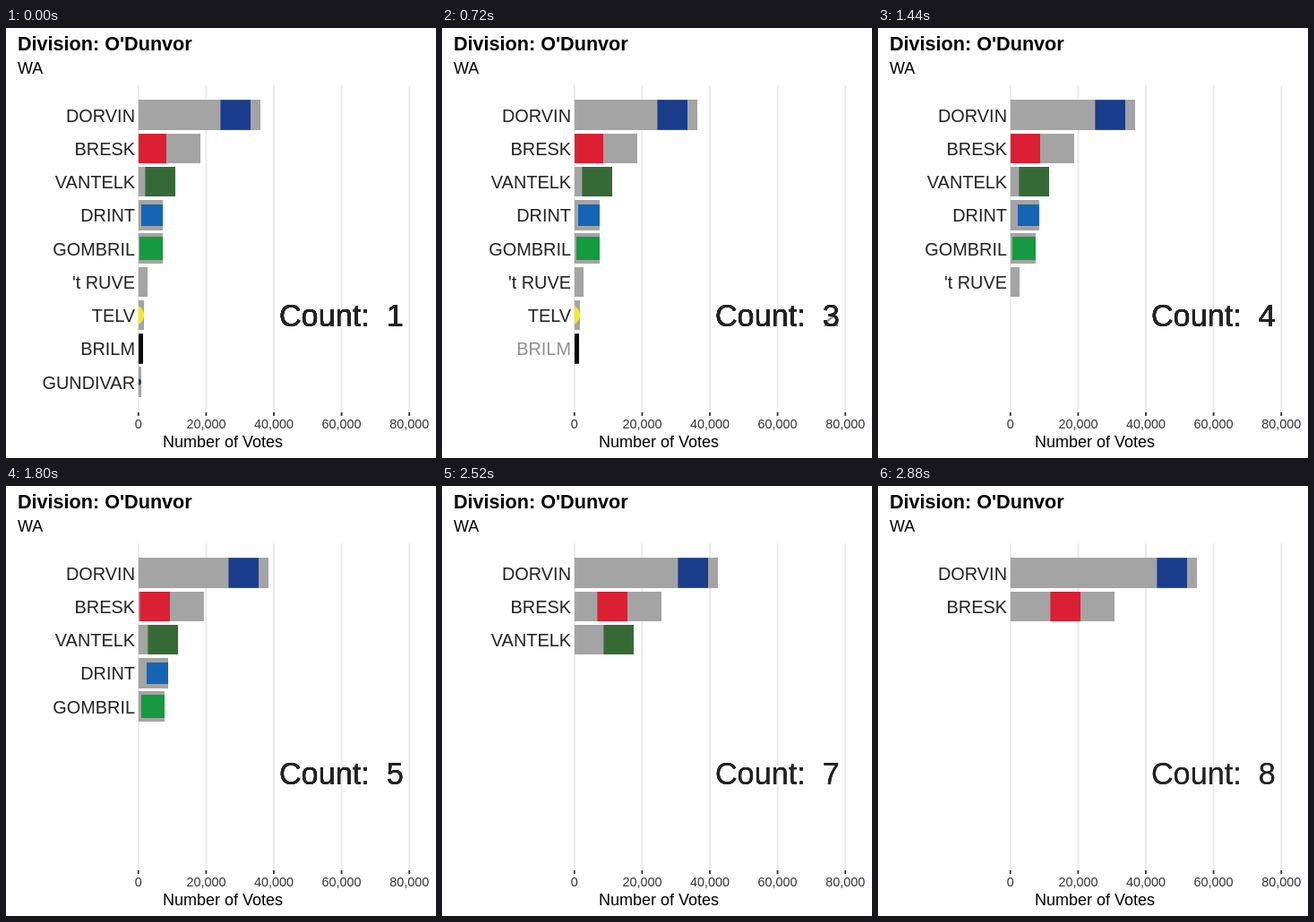
Write an HTML page with a canvas that moves like this. It is 480x480 px and loops after 3000 ms.

```html
<!DOCTYPE html>
<html lang="en">
<head>
<meta charset="utf-8">
<style>
  html, body { margin: 0; width: 100%; height: 100%; overflow: hidden; background: #fff; }
  canvas { display: block; }
</style>
</head>
<body>
<canvas width="480" height="480"></canvas>
<script>
const ctx = document.querySelector('canvas').getContext('2d');
const FONT = '"Liberation Sans", Arial, sans-serif';
const STEP = 120, STEPS = 25;
const LEFT = 148, TICK = 75.6, TOP = 97.1, PITCH = 37.25, BAR = 33.6;
const INK = '#222';

// Bar lengths are in pixels; on elimination, `heir` (row index) takes `share` of them
const rows = [
  { name: 'DORVIN', length: 136, color: '#1a3c8c', gap: 11 },
  { name: 'BRESK', length: 69, color: '#da2032', gap: 38 },
  { name: 'VANTELK', length: 41, color: '#356a36', heir: 0, share: 0.72 },
  { name: 'DRINT', length: 27, color: '#1565b4', size: 24, heir: 2, share: 0.55 },
  { name: 'GOMBRIL', length: 27, color: '#159a3f', size: 26, heir: 1, share: 0.6 },
  { name: "'t RUVE", length: 9.5, heir: 0, share: 0.6 },
  { name: 'TELV', length: 6, color: '#f8ea1c', size: 23, round: true, heir: 3, share: 0.4 },
  { name: 'BRILM', length: 5, color: '#0a0a0a', heir: 3, share: 0.4 },
  { name: 'GUNDIVAR', length: 3, color: '#27357e', size: 7, round: true, heir: 0, share: 0 }
];

// Drop the last bar: its heir gets the share, the rest follows the root of each length
function eliminate(lengths) {
  const lost = lengths.at(-1), { heir, share } = rows[lengths.length - 1];
  const weights = lengths.slice(0, -1).map((v, i) => share && i === heir ? 0 : Math.sqrt(v));
  const total = weights.reduce((a, b) => a + b);
  return weights.map((w, i) =>
    lengths[i] + lost * (i === heir ? share : 0) + lost * (1 - share) * w / total);
}

const counts = [rows.map(r => r.length)];
while (counts.at(-1).length > 2) counts.push(eliminate(counts.at(-1)));

function text(str, x, y, size, align = 'left', color = '#000', weight = '') {
  ctx.font = `${weight} ${size}px ${FONT}`;
  ctx.textAlign = align;
  ctx.fillStyle = color;
  ctx.fillText(str, x, y);
}

function rect(x, y, w, h, color) {
  ctx.fillStyle = color;
  ctx.fillRect(x, y, w, h);
}

function drawAxes() {
  rect(0, 0, 480, 480, '#fff');
  text("Division: O'Dunvor", 13, 25, 21.6, 'left', '#000', 'bold');
  text('WA', 13, 51, 18);
  for (let i = 0; i < 5; i++) {
    const x = LEFT - 0.2 + i * TICK;
    rect(x - 0.9, 64, 1.8, 365, '#e8e8e8');
    rect(x - 0.9, 429, 1.8, 4, '#333');
    text(i ? `${i * 20},000` : '0', x, 447, 14.4, 'center', '#333');
  }
  text('Number of Votes', 242, 468, 18, 'center');
}

// Grey bar with its badge set in from the right end
function drawBar({ color, size = BAR, gap = 0, round }, length, y, alpha) {
  const top = Math.round(y - BAR / 2), height = Math.round(y + BAR / 2) - top;
  const width = Math.round(length), x = LEFT + width - gap - size;
  ctx.save();
  ctx.beginPath();
  ctx.rect(LEFT, top, width, height);
  ctx.clip();
  ctx.globalAlpha = alpha;
  rect(LEFT, top, width, height, '#a4a4a4');
  if (color) {
    ctx.globalAlpha = 1;
    ctx.fillStyle = color;
    ctx.beginPath();
    ctx.roundRect(x, top + (height - size) / 2, size, size, round ? size / 2 : 0);
    ctx.fill();
  }
  ctx.restore();
}

function draw(step) {
  // The first three eliminations take four steps each, the others three
  const pos = Math.max(step / 4, step / 3 - 1);
  const state = Math.floor(pos), p = pos - state;
  const from = counts[state], to = counts[state + 1] || from;

  drawAxes();
  from.forEach((start, i) => {
    const leaving = i >= to.length;
    const length = leaving ? start : start + (to[i] - start) * p;
    const alpha = leaving ? 1 - p : 1;
    const y = TOP + i * PITCH;
    const count = state + 1 + (!leaving && p >= 0.5 ? 1 : 0);

    drawBar(rows[i], length, y, alpha);
    ctx.globalAlpha = alpha;
    text(rows[i].name, 144, y + 7.5, 19.9, 'right', INK);
    // Every row carries its own copy of the counter
    text(`Count:  ${count}`, 374.3, 333, 34.2, 'center', INK);
    ctx.globalAlpha = 1;
  });
}

function tick() {
  draw(Math.floor(performance.now() / STEP) % STEPS);
  requestAnimationFrame(tick);
}
tick();
</script>
</body>
</html>
```
